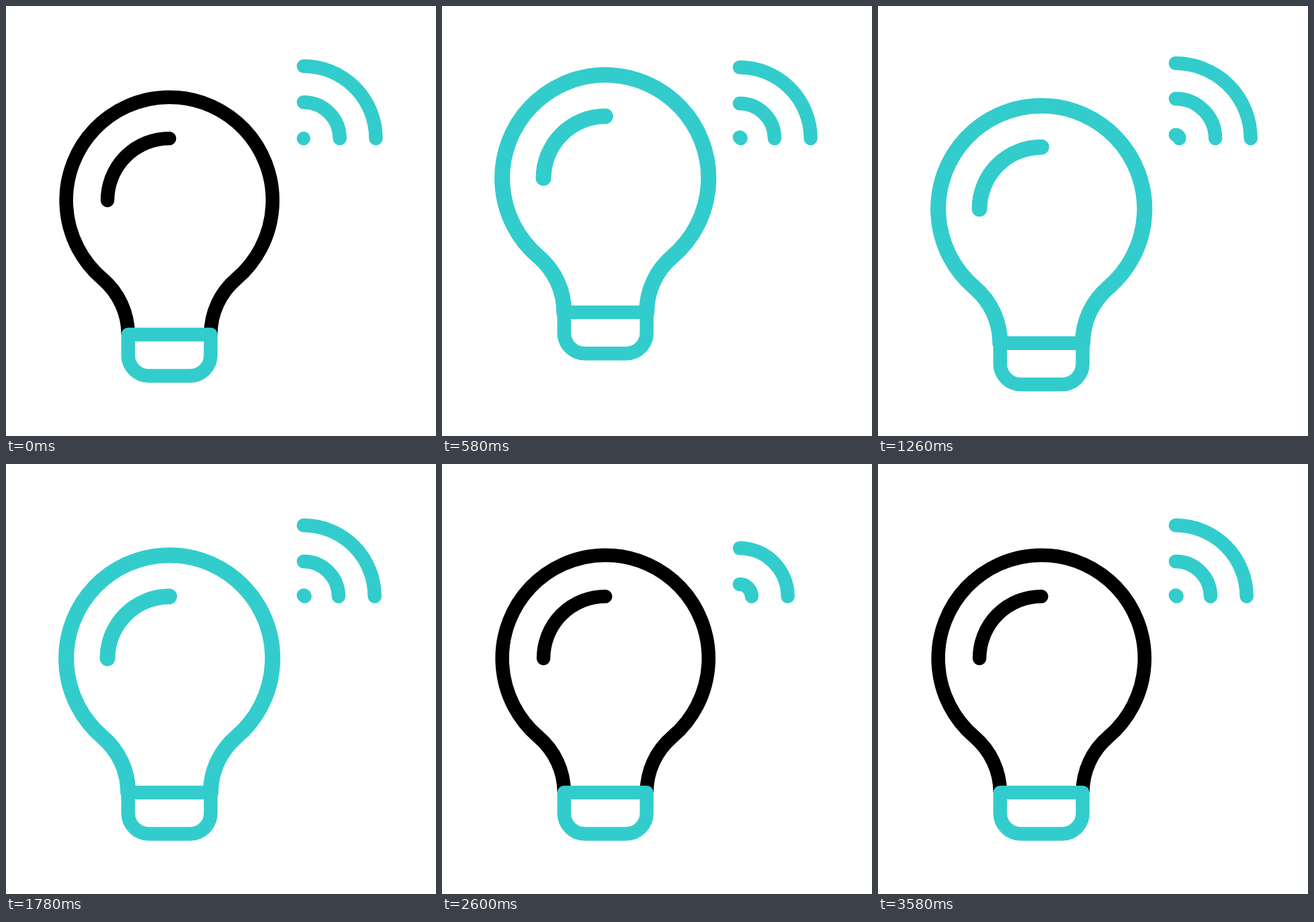
Recreate the animation shown at these times as an HTML page. Size 640 by 640 pixels, loop 3600 ms.

```html
<!DOCTYPE html>
<html lang="en">
<head>
<meta charset="utf-8">
<title>Smart bulb</title>
<style>
  html, body { margin: 0; width: 100%; height: 100%; overflow: hidden; background: #fff; }
  svg { display: block; width: 100%; height: 100%; }
  path { fill: none; stroke: #3cc; stroke-width: 16; stroke-linecap: round; stroke-linejoin: round; }
  #glass path { stroke: #000; }
  #glass path:first-child { stroke-linecap: butt; }
  #glass.lit path { stroke: #3cc; stroke-width: 18; stroke-linecap: round; }
</style>
</head>
<body>
<svg viewBox="0 0 500 500">
  <g id="bulb">
    <g id="glass">
      <path d="M142 382A85 85 0 0 0 112.15 317.3A120 120 0 1 1 267.85 317.3A85 85 0 0 0 238 382"/>
      <path d="M118 226A72 72 0 0 1 190 154"/>
    </g>
    <path d="M142 382H238V406A24 24 0 0 1 214 430H166A24 24 0 0 1 142 406Z"/>
  </g>
  <g id="rays">
    <path pathLength="1" d="M304.3 316.8l17.2 14.5"/>
    <path pathLength="1" d="M279.7 349.2l13.3 18"/>
  </g>
  <path id="waves"/>
</svg>
<script>
const LOOP = 3600;
const LIT = 425, UNLIT = 2400;
const WAVE_PERIOD = 600, WAVE_LIFE = 1350, WAVE_LEAD = 20;

const [bulb, glass, rays, waves] =
  ['bulb', 'glass', 'rays', 'waves'].map(id => document.getElementById(id));

// Eased 0 to 1 between two times
function ease(t, from, to) {
  const p = Math.min(1, Math.max(0, (t - from) / (to - from)));
  return p * p * (3 - 2 * p);
}

// Eased rise to 1, optional hold, then fall back to 0
const pulse = (t, from, top, fall, to) => ease(t, from, top) - ease(t, fall, to);

function wave(age) {
  const r = Math.abs(age) * 0.07 - Math.max(0, age - 1200) * 0.015;
  return r < 0.1 ? 'M346 154h0.01' : `M346 ${154 - r}A${r} ${r} 0 0 1 ${346 + r} 154`;
}

function draw(t) {
  const tilt = 5.3 * pulse(t, 120, 275, 275, 420) - 3 * pulse(t, 0, 120, 120, 275);
  const jump = 30 * pulse(t, LIT, 620, 1060, 1260);
  const dip = 10 * (pulse(t, 290, LIT, LIT, 620) + pulse(t, 1060, 1260, 1260, 1420)
    + pulse(t, 2240, UNLIT, UNLIT, 2560));
  bulb.setAttribute('transform', `translate(0 ${dip - jump}) rotate(${tilt} 190 430)`);
  glass.setAttribute('class', t >= LIT && t < UNLIT ? 'lit' : '');

  const tail = ease(t, 2330, 2430), length = ease(t, 2230, 2310) - tail;
  rays.setAttribute('visibility', length > 0 ? 'visible' : 'hidden');
  rays.setAttribute('stroke-dasharray', `${length} 2`);
  rays.setAttribute('stroke-dashoffset', -tail);

  let d = '';
  for (let age = (t + WAVE_LEAD) % WAVE_PERIOD - WAVE_LEAD; age < WAVE_LIFE; age += WAVE_PERIOD) {
    d += wave(age);
  }
  waves.setAttribute('d', d);
}

const start = performance.now();
function tick() {
  draw((performance.now() - start) % LOOP);
  requestAnimationFrame(tick);
}
tick();
</script>
</body>
</html>
```
